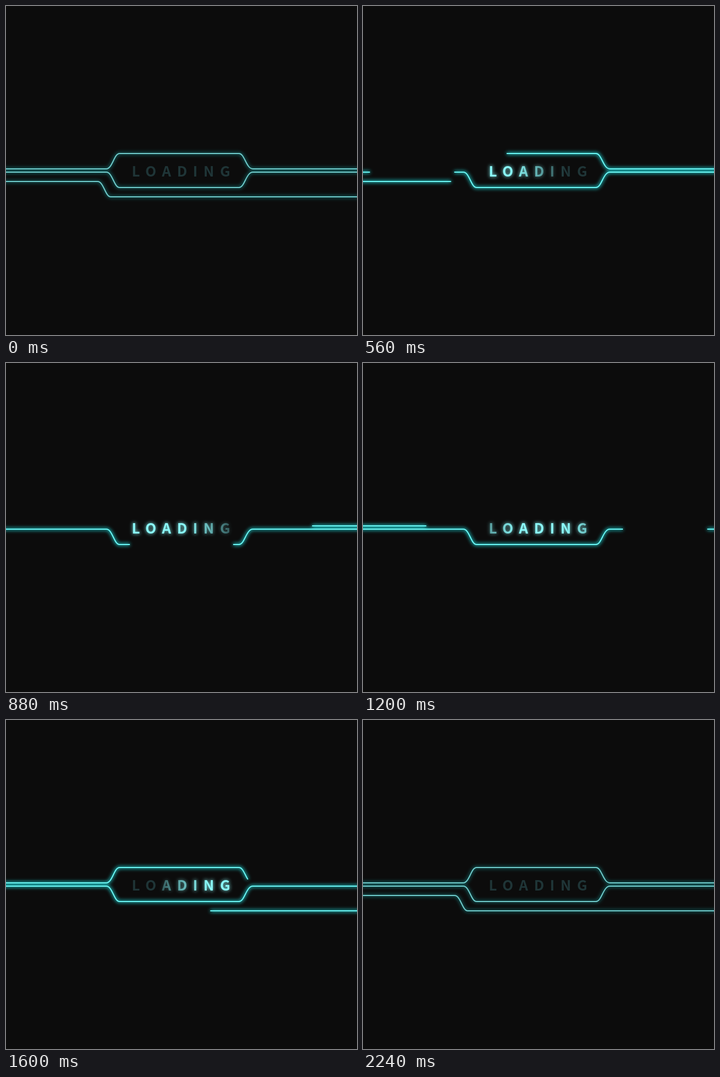
Write an HTML page that moves like this. It is 640 px wide and 600 px high and loops after 2400 ms.

```html
<!DOCTYPE html>
<html lang="en">
<head>
<meta charset="utf-8">
<title>Loading</title>
<style>
  html, body { margin: 0; width: 100%; height: 100%; overflow: hidden; background: #0c0c0c; }
  svg { display: block; width: 640px; height: 600px; }
  path { fill: none; }
  text {
    font: 700 26px "Noto Sans CJK SC", "Noto Sans CJK JP", "Noto Sans", sans-serif;
    letter-spacing: 10.65px;
    text-anchor: middle;
  }
</style>
</head>
<body>
<svg viewBox="0 0 640 600">
  <defs>
    <filter id="blur" filterUnits="userSpaceOnUse" x="-30" y="220" width="700" height="170" color-interpolation-filters="sRGB">
      <feGaussianBlur stdDeviation="3"/>
    </filter>
    <linearGradient id="shine" gradientUnits="userSpaceOnUse" x1="0" y1="0" x2="640" y2="0">
      <stop stop-color="#8af8f8" stop-opacity="0"/>
      <stop stop-color="#8af8f8"/>
      <stop stop-color="#8af8f8"/>
      <stop stop-color="#8af8f8" stop-opacity="0"/>
    </linearGradient>
  </defs>
  <g id="glow" filter="url(#blur)" stroke="#1fd6d6" stroke-width="5"></g>
  <g id="core" stroke-width="2"></g>
  <text x="324.4" y="311" fill="#1f3537">LOADING</text>
  <text x="324.4" y="311" fill="url(#shine)" stroke="url(#shine)" stroke-width="2" filter="url(#blur)" opacity="0.65">LOADING</text>
  <text x="324.4" y="311" fill="url(#shine)">LOADING</text>
</svg>
<script>
const LOOP = 2400, STEP = 40, WIDTH = 640;
const REACH = 80; // how far each sweep runs past both ends of its line
const SOFT = 50;  // half width of the shine's soft edges

const byId = id => document.getElementById(id);
const mix = (a, b, k) => a + (b - a) * k;
const progress = (t, from, to) => Math.min(Math.max((t - from) / (to - from), 0), 1);
const easeInOut = k => (1 - Math.cos(Math.PI * k)) / 2;
const pulse = (t, from, to) => easeInOut(progress(t, from, to));

// A gap opens along each line during `erase` and closes during `redraw`, both [start, end] times.
const lines = [
  {
    d: "M-20 297H183c11 0 14-28 24-28H425c10 0 13 28 25 28H660",
    erase: [-50, 1284], redraw: [703, 2201]
  },
  {
    d: "M-20 303H183c11 0 14 28 24 28H425c10 0 13-28 25-28H660",
    erase: [-50, 1583], redraw: [177, 1810]
  },
  {
    d: "M-20 320H167c11 0 14 28 24 28H660",
    erase: [-50, 922], redraw: [1175, 2108], reverse: true
  }
];

for (const line of lines) {
  line.paths = ["glow", "core"].map(id => {
    const path = document.createElementNS("http://www.w3.org/2000/svg", "path");
    path.setAttribute("d", line.d);
    byId(id).append(path);
    return path;
  });
  line.length = line.paths[0].getTotalLength();
}
const stops = document.querySelectorAll("#shine stop");

function drawLine({ paths, length, erase, redraw, reverse }, t) {
  const sweep = span => {
    const x = mix(-REACH, length + REACH, pulse(t, ...span));
    return Math.min(Math.max(x, 0), length);
  };
  let start = sweep(redraw), end = sweep(erase);
  if (reverse) [start, end] = [length - end, length - start];
  const dashes = end > start ? `${start} ${end - start} ${length - end} ${length}` : "none";
  for (const path of paths) path.setAttribute("stroke-dasharray", dashes);
}

function draw(t) {
  for (const line of lines) drawLine(line, t);

  const power = pulse(t, 60, 620) - pulse(t, 1500, 2220);
  byId("glow").setAttribute("opacity", mix(0.38, 0.82, power));
  byId("core").setAttribute("stroke", `rgb(${mix(112, 108, power)},${mix(204, 250, power)},${mix(204, 248, power)})`);

  const head = mix(160, 540, progress(t, 60, 2240) ** 0.6);
  const tail = mix(130, 470, progress(t, 560, 2240) ** 1.2);
  [tail - SOFT, tail + SOFT, head - SOFT, head + SOFT]
    .forEach((x, i) => stops[i].setAttribute("offset", x / WIDTH));
}

function tick() {
  const t = performance.now() % LOOP;
  draw(Math.floor(t / STEP) * STEP);
  requestAnimationFrame(tick);
}
tick();
</script>
</body>
</html>
```
